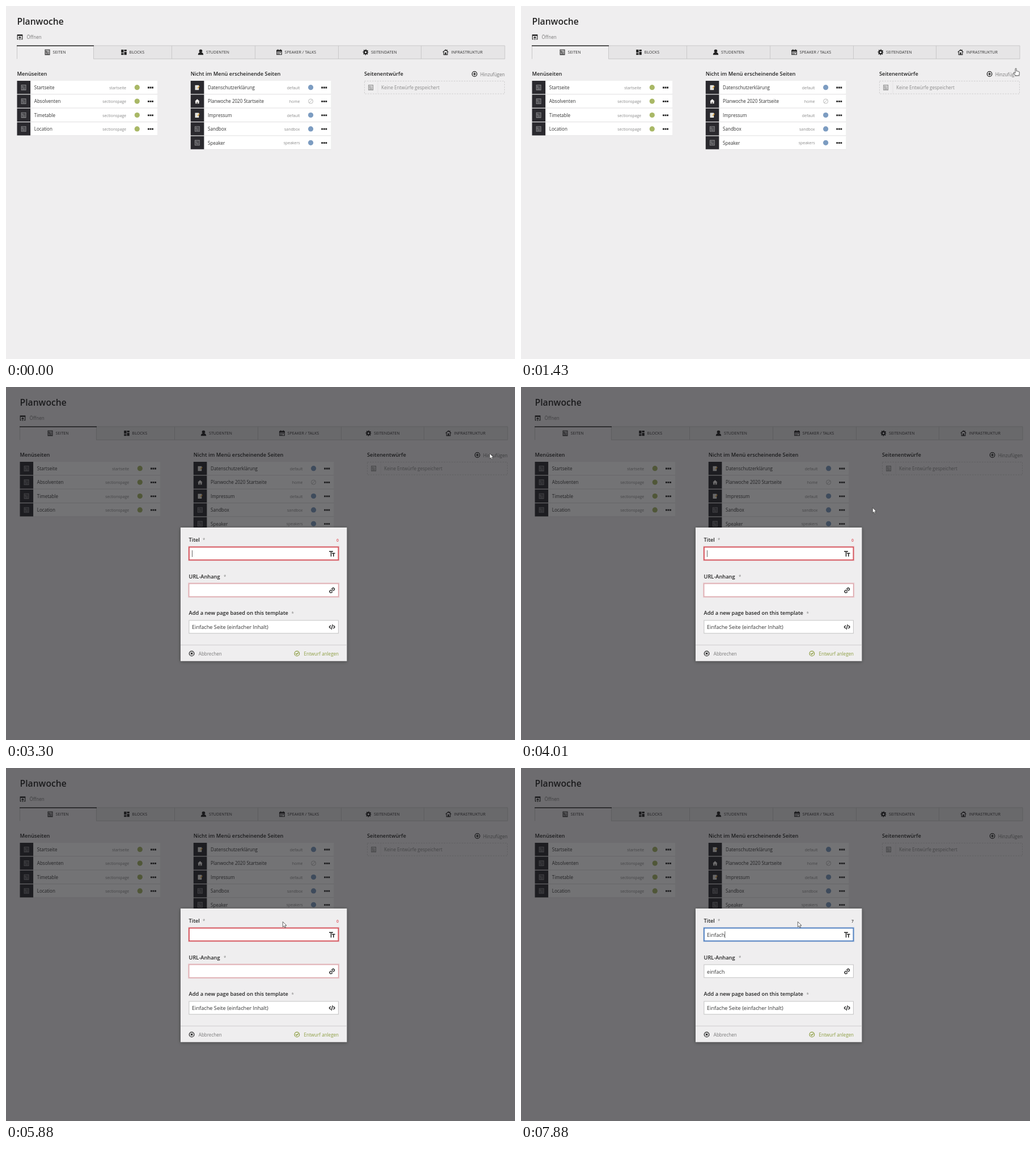
Recreate the animation shown at these times as an HTML page. Size 898 px wide and 623 px high, loop 8 s.

```html
<!DOCTYPE html>
<html lang="de">
<head>
<meta charset="utf-8">
<title>Planwoche</title>
<style>
html, body { margin: 0; width: 100%; height: 100%; overflow: hidden; background: #efeeef; }
svg { display: block; width: 898px; height: 623px; }
text { font: 8.06px "Open Sans", "Noto Sans", sans-serif; fill: #333; white-space: pre; }
.h1 { font-size: 15.7px; font-weight: 600; fill: #222; }
.h2 { font-size: 9.25px; font-weight: 600; fill: #222; }
.tab { font-size: 7.15px; font-weight: 500; }
.tpl { font-size: 6.9px; fill: #8a8a8a; }
.soft { fill: #777; }
.dim { fill: #8a8a8a; }
.field { font-size: 9.2px; }
.end { text-anchor: end; }
.ok { fill: #8c9d40; }
.count { font-size: 6.8px; font-weight: 600; }
.line { fill: none; stroke: currentColor; stroke-width: 1.1; }
.solid { fill: currentColor; }

.box { fill: #fff; stroke: #c4c3c4; }
.halo { fill: none; stroke: #d8626b; stroke-width: 3.4; opacity: .25; }
.invalid .title { stroke: #d4525a; stroke-width: 1.8; }
.invalid .slug { stroke: #d79ba0; }
.invalid .count { fill: #e04a54; }
.valid .title { stroke: #4f7fc0; stroke-width: 1.8; }
.valid .title-halo { stroke: #4f7fc0; }
.valid .slug-halo { display: none; }

#page, #modal, #cursor, #arrow, #hand, #add { animation: 8s step-end infinite; }
#page { animation-name: shift; }
#modal { animation-name: open; }
#add { animation-name: hover; }
#cursor { animation-name: move; animation-timing-function: linear; }
#arrow { animation-name: arrow; }
#hand { animation-name: hand; }
@keyframes shift { 0% { transform: translate(0, 0); } 41.25%, 100% { transform: translate(5px, 0); } }
@keyframes open { 0% { visibility: hidden; } 41.25%, 100% { visibility: visible; } }
@keyframes hover { 0%, 41.25%, 100% { fill: #777; } 18.75% { fill: #5c5c5c; } }
@keyframes arrow {
  0%, 16.125% { visibility: hidden; }
  1.75%, 35.875%, 100% { visibility: visible; }
}
@keyframes hand { 0%, 35.875%, 100% { visibility: hidden; } 16.125% { visibility: visible; } }
@keyframes move {
  0%, 1.75% { transform: translate(891px, 562px); animation-timing-function: ease-in-out; }
  14.375% { transform: translate(884px, 98px); }
  17.875% { transform: translate(872px, 110px); animation-timing-function: ease-out; }
  23.25%, 43% { transform: translate(853px, 117px); }
  44.75% { transform: translate(816px, 126px); animation-timing-function: ease-out; }
  57.5%, 100% { transform: translate(488px, 271px); }
}
</style>
</head>
<body>
<svg viewBox="0 0 898 623">
  <defs>
    <filter id="shadow" x="-10%" y="-10%" width="120%" height="125%">
      <feDropShadow dx="0" dy="1" stdDeviation="3" flood-opacity=".35"/>
    </filter>
    <g id="doc">
      <path class="line" stroke-width="1" d="M-3.9-4.3H3.9V4.3H-3.9Z"/>
      <path class="line" style="stroke-width:.9" d="M-2.4-2.4H-.4V-.2H-2.4ZM.8-2.4H2.6M.8-.5H2.6M-2.6 1.1H2.6M-2.6 2.7H2.6"/>
    </g>
    <path id="blocks" class="solid" d="M-4.8-4.6H-.5V.7H-4.8ZM.5-4.6H4.8V-1.6H.5ZM-4.8 1.7H-.5V4.6H-4.8ZM.5-.6H4.8V4.6H.5Z"/>
    <path id="person" class="solid" d="M0-4.8A2.5 2.6 0 0 1 1.3.2Q4.7 1 4.7 4.6H-4.7Q-4.7 1-1.3.2A2.5 2.6 0 0 1 0-4.8Z"/>
    <g id="calendar">
      <path class="line" d="M-4.3-3.4H4.3V4.2H-4.3Z"/>
      <path class="solid" d="M-4.6-3.8H4.6V-1.2H-4.6ZM-3-5H-1.6V-3H-3ZM1.6-5H3V-3H1.6ZM-3 0H-1.5V1.3H-3ZM-.7 0H.7V1.3H-.7ZM1.5 0H3V1.3H1.5ZM-3 2.1H-1.5V3.3H-3ZM-.7 2.1H.7V3.3H-.7Z"/>
    </g>
    <g id="gear" fill="none" stroke="currentColor">
      <circle r="2.7" stroke-width="2.2"/>
      <circle r="4.2" stroke-width="1.7" stroke-dasharray="1.65 1.649" stroke-dashoffset=".8"/>
    </g>
    <g id="home">
      <path class="line" d="M-4.9-.2L0-4.3L4.9-.2M-3.3-1V4.3H3.3V-1M2.6-4.6V-2.4"/>
      <path class="solid" d="M-1.2 4.4V.3H1.2V4.4Z"/>
    </g>
    <g id="house">
      <path fill="#f4f2f0" d="M0-4L4.2 0H3.2V4H-3.2V0H-4.2Z"/>
      <path fill="#55504e" d="M-.9 4V1.2H.9V4Z"/>
    </g>
    <g id="memo">
      <path fill="#f3f2ec" d="M-3.8-4H2.8V4.4H-3.8Z"/>
      <path stroke="#b9bcc0" stroke-width=".6" d="M-2.7-2H1.5M-2.7-.4H1M-2.7 1.2H0M-2.7 2.8H1.5"/>
      <path stroke="#e0a53c" stroke-width="1.5" d="M4-2.6L.6 1.4"/>
    </g>
    <path id="dots" class="solid" d="M-5-1.4h2.8v2.8h-2.8zM-1.4-1.4h2.8v2.8h-2.8zM2.2-1.4h2.8v2.8h-2.8z"/>
    <g id="ring"><circle class="line" r="4.3" style="stroke-width:1.2"/></g>
  </defs>

  <rect width="898" height="623" fill="#efeeef"/>
  <g id="page">
    <text class="h1" x="19.5" y="33">Planwoche</text>
    <g transform="translate(24.5 55)" color="#222">
      <path class="line" d="M-2.2 3.8H-4.3V-4H4.3V3.8H2.2M0 5V0M-2.2 1.6L0-.6L2.2 1.6"/>
      <path class="solid" d="M-4.6-4.5H4.6V-2.2H-4.6Z"/>
    </g>
    <text class="soft" x="36.5" y="58.2">Öffnen</text>
    <g id="tabs"></g>
    <text class="h2" x="19.5" y="122.5">Menüseiten</text>
    <text class="h2" x="325.7" y="122.5">Nicht im Menü erscheinende Seiten</text>
    <text class="h2" x="632" y="122.5">Seitenentwürfe</text>
    <g id="rows"></g>
    <g transform="translate(826.6 120)" color="#222">
      <use href="#ring"/><path class="line" d="M-2.4 0H2.4M0-2.4V2.4" style="stroke-width:1.3"/>
    </g>
    <text id="add" class="end soft" x="880" y="123.7">Hinzufügen</text>
    <rect x="632.5" y="132.5" width="247" height="22.5" fill="none" stroke="#cfcecf" stroke-dasharray="2.5 2"/>
    <path d="M656 133V155" stroke="#e4e3e4"/>
    <use href="#doc" x="643.6" y="143.8" color="#8d8d8d"/>
    <text class="dim" x="662" y="147">Keine Entwürfe gespeichert</text>
  </g>

  <g id="modal">
    <rect width="898" height="623" fill="#16171a" opacity=".6"/>
    <rect x="308" y="248" width="293.3" height="235.7" fill="#efeeef" filter="url(#shadow)"/>
    <path d="M308 455.3H601.3" stroke="#cdcccd"/>
    <g id="form" class="invalid">
      <text class="h2" x="322.6" y="272.8">Titel</text><text class="dim" x="347" y="273">*</text>
      <text id="count" class="count end" x="587" y="272.6">0</text>
      <text class="h2" x="322.6" y="337.6">URL-Anhang</text><text class="dim" x="384" y="337.8">*</text>
      <text class="h2" x="322.6" y="402.3">Add a new page based on this template</text><text class="dim" x="503.6" y="402.5">*</text>
      <rect class="halo title-halo" x="322.8" y="282.4" width="263.8" height="23"/>
      <rect class="box title" x="323" y="282.5" width="263.4" height="22.8"/>
      <rect class="halo slug-halo" x="322.8" y="347" width="263.8" height="23"/>
      <rect class="box slug" x="322.9" y="347.1" width="263.5" height="22.8"/>
      <rect class="box" x="322.9" y="411.9" width="263.5" height="22.8"/>
      <text id="title" class="field" x="328" y="297.8"></text>
      <path id="caret" d="M.5 288.2V300" stroke="#555" stroke-width=".9"/>
      <text id="slug" class="field" x="328" y="362.6"></text>
      <text class="field" x="328" y="427.4">Einfache Seite (einfacher Inhalt)</text>
      <g color="#222" stroke-linecap="butt">
        <path class="line" style="stroke-width:1.5" d="M570 290.2H577M573.5 290.2V299.3M575 293.4H580.6M577.8 293.4V299.3"/>
        <path class="line" style="stroke-width:1.35" transform="translate(575.2 358.8) rotate(-45)" d="M-.9-2.1H-3A2.1 2.1 0 0 0-3 2.1H-.9M.9-2.1H3A2.1 2.1 0 0 1 3 2.1H.9M-2.1 0H2.1"/>
        <path class="line" style="stroke-width:1.4" d="M572.8 420.8L570.4 423.5L572.8 426.2M577.6 420.8L580 423.5L577.6 426.2M576.2 419.2L574.2 427.8"/>
        <g transform="translate(327.6 470.4)"><use href="#ring"/><path class="line" d="M-1.7-1.7L1.7 1.7M1.7-1.7L-1.7 1.7" style="stroke-width:1.4"/></g>
      </g>
      <g color="#8c9d40" transform="translate(513.3 470.4)"><use href="#ring"/><path class="line" d="M-2.2-.2L-.5 1.6L2.4-1.6" style="stroke-width:1.4"/></g>
      <text class="soft" x="339.8" y="473.9">Abbrechen</text>
      <text class="ok end" x="587" y="473.9">Entwurf anlegen</text>
    </g>
  </g>

  <g id="cursor">
    <path id="arrow" d="M.3.3V9.6L2.5 7.6L4 11L5.6 10.3L4.1 7H7Z" fill="#fff" stroke="#333" stroke-width=".75"/>
    <path id="hand" d="M.1 1A1 1 0 0 1 2.1 1V5L3 4.7Q4 4.6 4.1 5.3Q5.6 4.8 5.9 5.7Q7.3 5.5 7.3 6.8V9.4Q7.2 11 6.4 12.8H.4Q-.8 10.8-2.9 8.2Q-3.1 7-2 7L.1 8.4Z" fill="#fff" stroke="#333" stroke-width=".8"/>
  </g>
</svg>
<script>
const $ = id => document.getElementById(id);
const LOOP = 8000, BLINK_START = 3010, BLINK = 500;
const TYPE_START = 6300, KEY = 230, WORD = 'Einfach';

// icon, icon x, label x, label, left edge
const tabs = [
  ['doc', 73, 82.5, 'SEITEN', 19.5],
  ['blocks', 208, 217.5, 'BLOCKS', 154.5],
  ['person', 343.5, 353, 'STUDENTEN', 292.5],
  ['calendar', 482, 491.5, 'SPEAKER / TALKS', 439.5],
  ['gear', 634.5, 644, 'SEITENDATEN', 586.5],
  ['home', 775.5, 785.5, 'INFRASTRUKTUR', 732.5],
];
$('tabs').innerHTML = `
  <rect x="154.5" y="70" width="725.5" height="23.4" fill="#e6e5e6"/>
  <path d="M154.5 70H880M154.5 93.3H880" stroke="#c9c8c9"/>` +
  [...tabs.map(t => t[4]), 880].map(x => `<path d="M${x} 70V93.5" stroke="#c9c8c9"/>`).join('') +
  '<path d="M19 70.2H155" stroke="#222" stroke-width="1.6"/>' +
  tabs.map(([icon, ix, x, label]) => `
    <use href="#${icon}" x="${ix}" y="81.6" color="#222"/>
    <text class="tab" x="${x}" y="84.2">${label}</text>`).join('');

function row(left, i, title, template, icon, status) {
  const dot = {
    green: '<circle r="4.6" fill="#a9b866"/>',
    blue: '<circle r="4.6" fill="#7c9cc1"/>',
    none: '<path class="line" color="#aaa" style="stroke-width:.8" d="M-4 0A4 4 0 1 1 4 0A4 4 0 1 1-4 0M-2.8 2.8L2.8-2.8"/>',
  }[status];
  return `<g transform="translate(${left} ${132 + 24.4 * i})">
    <rect y=".7" width="247.7" height="23.2" fill="#dddcdd"/>
    <rect width="247.7" height="23.2" fill="#fff"/>
    <rect width="23.6" height="23.2" fill="#2a292e"/>
    <use href="#${icon}" x="11.6" y="11.8" color="#8b8b8e"/>
    <text x="30.3" y="15">${title}</text>
    <text class="tpl end" x="192.7" y="14.8">${template}</text>
    <g transform="translate(211.8 11.7)">${dot}</g>
    <use href="#dots" x="235.5" y="12" color="#222"/></g>`;
}
const menu = [['Startseite', 'startseite'], ['Absolventen', 'sectionspage'],
  ['Timetable', 'sectionspage'], ['Location', 'sectionspage']];
const hidden = [
  ['Datenschutzerklärung', 'default', 'memo', 'blue'],
  ['Planwoche 2020 Startseite', 'home', 'house', 'none'],
  ['Impressum', 'default', 'memo', 'blue'],
  ['Sandbox', 'sandbox', 'doc', 'blue'],
  ['Speaker', 'speakers', 'doc', 'blue'],
];
$('rows').innerHTML =
  menu.map((r, i) => row(19.5, i, ...r, 'doc', 'green')).join('') +
  hidden.map((r, i) => row(325.8, i, ...r)).join('');

let start, shown = -1;
function render(now) {
  start ??= now;
  const t = (now - start) % LOOP;
  const typed = Math.max(0, Math.min(WORD.length, Math.floor((t - TYPE_START) / KEY) + 1));
  if (typed !== shown) {
    shown = typed;
    const text = WORD.slice(0, typed);
    $('title').textContent = text;
    $('slug').textContent = text.toLowerCase();
    $('count').textContent = typed;
    $('form').setAttribute('class', typed ? 'valid' : 'invalid');
    const x = 328 + (typed ? $('title').getComputedTextLength() : 0);
    $('caret').setAttribute('transform', `translate(${x} 0)`);
  }
  const lit = typed > 0 || Math.floor((t - BLINK_START) / BLINK) % 2 === 0;
  $('caret').setAttribute('opacity', lit ? 1 : 0);
  requestAnimationFrame(render);
}
requestAnimationFrame(render);
</script>
</body>
</html>
```
